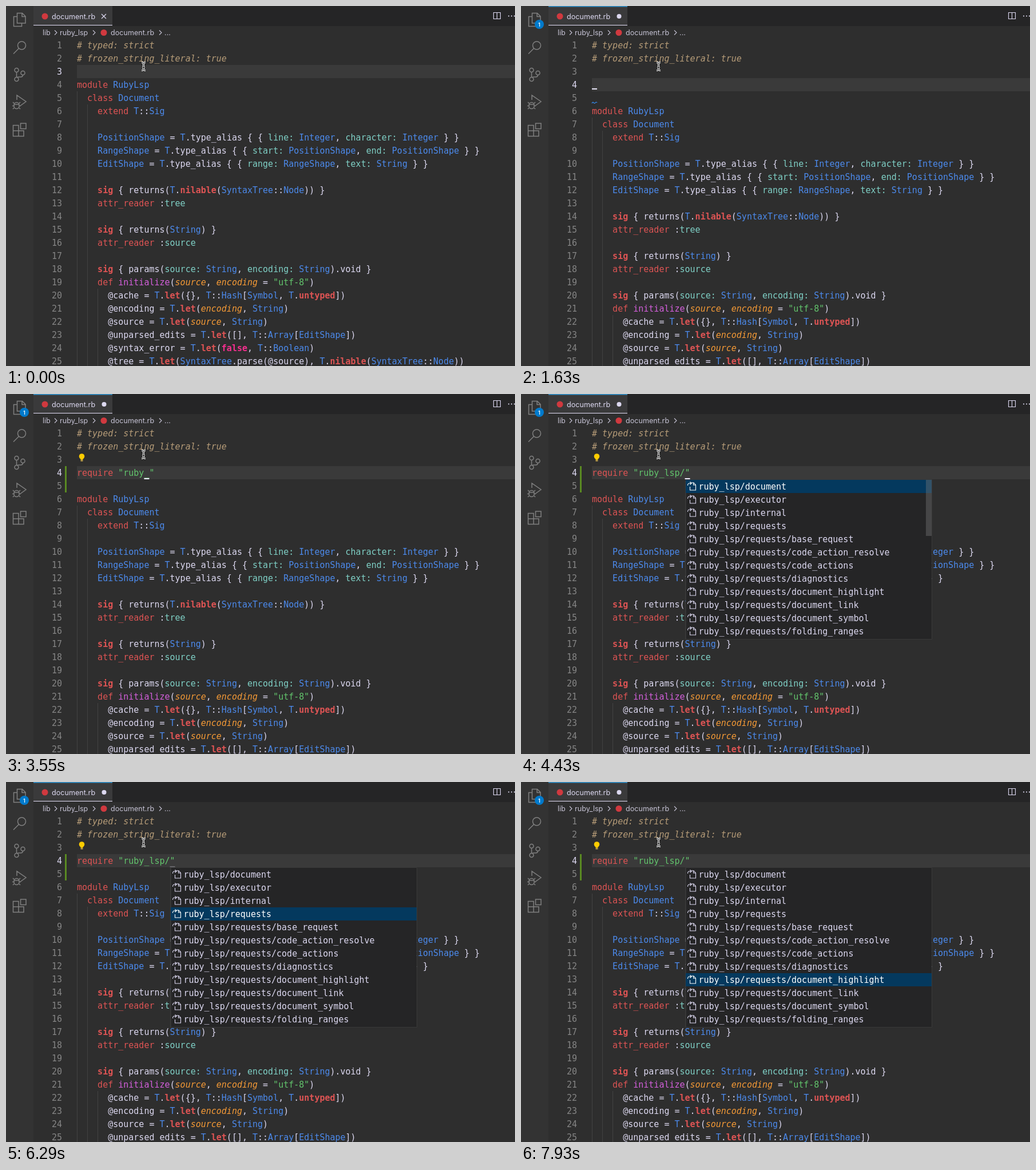
An HTML page with a canvas for the animation above (8000 ms loop, 890 by 629 pixels).

```html
<!DOCTYPE html>
<html>
<head>
<meta charset="utf-8">
<style>
html, body { margin: 0; width: 100%; height: 100%; overflow: hidden; background: #2e2e2e; }
canvas { display: block; }
</style>
</head>
<body>
<canvas id="stage" width="890" height="629"></canvas>
<script>
const ctx = document.getElementById('stage').getContext('2d');
const LOOP = 8000, LEFT = 124, TOP = 57, ROW = 23, CHAR = 9.03;
const MONO = '15px "DejaVu Sans Mono", monospace';
const UI = '12.6px Inter, sans-serif';
const C = {
  bg: '#2e2e2e', fg: '#dcd8f0', red: '#de5454', blue: '#4c8aec', green: '#62c46c',
  teal: '#7fd0c6', tan: '#b69c78', orange: '#f59a36', purple: '#d45fdc', pink: '#f52f8f',
  grey: '#858585', icon: '#808080', error: '#e4685e'
};

const HEAD = ['# typed: strict', '# frozen_string_literal: true', ''];
const BODY = `module RubyLsp
  class Document
    extend T::Sig

    PositionShape = T.type_alias { { line: Integer, character: Integer } }
    RangeShape = T.type_alias { { start: PositionShape, end: PositionShape } }
    EditShape = T.type_alias { { range: RangeShape, text: String } }

    sig { returns(T.nilable(SyntaxTree::Node)) }
    attr_reader :tree

    sig { returns(String) }
    attr_reader :source

    sig { params(source: String, encoding: String).void }
    def initialize(source, encoding = "utf-8")
      @cache = T.let({}, T::Hash[Symbol, T.untyped])
      @encoding = T.let(encoding, String)
      @source = T.let(source, String)
      @unparsed_edits = T.let([], T::Array[EditShape])
      @syntax_error = T.let(false, T::Boolean)
      @tree = T.let(SyntaxTree.parse(@source), T.nilable(SyntaxTree::Node))`.split('\n');

const ITEMS = ['document', 'executor', 'internal', 'requests',
  ...['base_request', 'code_action_resolve', 'code_actions', 'diagnostics', 'document_highlight',
    'document_link', 'document_symbol', 'folding_ranges'].map(s => 'requests/' + s)];

const TYPED = 'require "ruby_lsp/';
const KEYS = [1690, 1760, 1830, 1900, 1960, 2030, 2100, 2190, 2420,
  2980, 3090, 3190, 3290, 3550, 3750, 3840, 3930, 4190];
const NEWLINES = [1390, 1510], CARET_DOWN = 1562, POPUP = 4430;
const PICKS = [5810, 6050, 6290, 6530, 6790, 6970, 7210, 7420];

// Token rules in order of priority: pattern, colour, font style
const RULES = [
  ['^#.*', C.tan, 'italic '],
  ['"[^"]*"', C.green],
  ['@\\w+', C.fg],
  ['\\b(?:sig|let|nilable|untyped)\\b', C.red, 'bold '],
  ['\\bfalse\\b', C.pink, 'bold '],
  ['\\b(?:module|class|extend|attr_reader|def|require)\\b', C.red],
  ['\\binitialize\\b', C.purple],
  ['\\b[A-Z]\\w*', C.blue],
  ['\\b[a-z]\\w*:(?!:)', C.teal],
  ['(?<=\\s:)\\w+', C.teal],
  ['\\b(?:source|encoding)\\b', C.orange, 'italic '],
  ['[^\\s\\w"@]+', C.fg],
  ['\\w+|"', C.fg]
];
const TOKEN = new RegExp(RULES.map(r => `(${r[0]})`).join('|'), 'g');

const clamp = v => Math.max(0, Math.min(1, v));
const ramp = (t, start, length) => clamp((t - start) / length);
const count = (times, t) => times.filter(k => k <= t).length;
const lineTop = n => TOP + ROW * (n - 1);

function rect(x, y, w, h, color) {
  ctx.fillStyle = color;
  ctx.fillRect(x, y, w, h);
}

function text(s, x, y, color, font = MONO, align = 'left') {
  ctx.font = font;
  ctx.textAlign = align;
  ctx.fillStyle = color;
  ctx.fillText(s, x, y);
}

function dot(x, y, r, color) {
  ctx.fillStyle = color;
  ctx.beginPath();
  ctx.arc(x, y, r, 0, 7);
  ctx.fill();
}

function line(d, color, width = 1) {
  ctx.strokeStyle = color;
  ctx.lineWidth = width;
  ctx.stroke(new Path2D(d));
}

function code(s, y) {
  for (const m of s.matchAll(TOKEN)) {
    const [, color, style = ''] = RULES[m.slice(1).findIndex(g => g !== undefined)];
    text(m[0], LEFT + m.index * CHAR, y, color, style + MONO);
  }
}

function squiggle(y, color) {
  line(`M124 ${y + 1}q1.5-3 3-1t3 0t3 0`, color, 1.2);
}

function activityBar(dirty) {
  rect(0, 0, 48, 629, '#333333');
  const d = [
    'M19.5 12.5h9l5.5 5.5v12h-14.500zM28 12.500v6h6M19 18.500h-5.500v17h14v-5',
    'M20.500 69a7 7 0 1 0 14 0a7 7 0 1 0-14 0M22.500 74L13 83.500',
    'M15 112a3.500 3.500 0 1 0 7 0a3.500 3.500 0 1 0-7 0M15 128a3.500 3.500 0 1 0 7 0a3.500 3.500 0 1 0-7 0' +
      'M26 117a3.500 3.500 0 1 0 7 0a3.500 3.500 0 1 0-7 0M18.500 115.500v9M29.500 120.500q0 3.500-4 3.500h-3q-4 0-4 1',
    'M19 164v-8l16 11-11 8M14 173a4.500 4.500 0 0 1 9 0v2a4.500 4.500 0 0 1-9 0z' +
      'M14 172h9M12 168l2 2M25 168l-2 2M11 174.500h3M23 174.500h3M12 180l2-2M25 180l-2-2',
    'M12.500 208.500h9.500v9.500h9v9.500h-18.500zM12.500 218h9.500v9.500M25.500 205h9.500v9.500h-9.500z'
  ];
  d.forEach(p => line(p, C.icon, 1.5));
  if (dirty) {
    dot(32, 32, 8, '#007acc');
    text('1', 32, 35.5, '#fff', '600 9px Inter, sans-serif', 'center');
  }
}

function header(dirty, failing) {
  const width = failing ? 149 : 138, end = 48 + width;
  rect(48, 0, 842, 35, '#252526');
  rect(48, 0, width, 35, '#3a3a3b');
  rect(48, 33, width, 1, C.fg);
  if (dirty) rect(48, 0, width, 1.5, '#2f93d0');
  dot(68, 18, 5.5, '#d0393f');
  text('document.rb', 80, 22.5, failing ? C.error : C.fg, UI);
  if (failing) text('1', 162, 22.5, C.error, UI);
  if (dirty) dot(end - 14.5, 18, 4, C.fg);
  else line('M167 14l8 8m0-8l-8 8', C.fg, 1.2);
  line('M852.500 11.500h12v11h-12zM858.500 11.500v11', C.fg, 1.1);
  for (const x of [879, 884, 889]) dot(x, 17.500, 1.1, C.fg);

  const crumb = '#c5c2d4';
  text('lib', 64, 51, crumb, UI);
  text('ruby_lsp', 94, 51, crumb, UI);
  text('document.rb', 183, 51, crumb, UI);
  text('...', 277, 51, crumb, UI);
  for (const x of [85, 152, 268]) line(`M${x} 42.500l4 4-4 4`, crumb, 1.1);
  dot(171, 46.500, 5.5, '#d0393f');
}

function editor(lines, active, extra) {
  rect(LEFT, lineTop(active), 766, ROW, '#3a3a3a');
  // Indent guides: x and first line
  for (const [x, first] of [[124, 5], [142, 6], [160, 20]]) {
    rect(x, lineTop(first + extra), 1, 629, '#424242');
  }
  lines.slice(0, 25).forEach((s, i) => {
    const y = lineTop(i + 1) + 17;
    text(i + 1, 98, y, i + 1 === active ? C.fg : C.grey, MONO, 'right');
    code(s, y);
  });
}

function caretAlpha(t) {
  if (t < 1390) return ramp(t, 360, 140) - ramp(t, 720, 140);
  if (t < 4770) return 1;
  const p = (t - 4770) % 1010;
  return 1 - ramp(p, 0, 130) + ramp(p, 480, 130);
}

function caret(t, typed) {
  ctx.globalAlpha = caretAlpha(t);
  if (t < 1390) {
    rect(LEFT, lineTop(3), 9, ROW, C.fg);
  } else {
    const col = typed ? typed - 1 + ramp(t, KEYS[typed - 1], 80) : 0;
    const row = 3 + ramp(t, CARET_DOWN, 80);
    rect(LEFT + col * CHAR, lineTop(row + 1) - 2, 9, 2, '#efecff');
  }
  ctx.globalAlpha = 1;
}

function bulb() {
  dot(132.5, 109, 4.8, '#ffcc00');
  rect(130.5, 112, 4, 3, '#ffcc00');
  rect(130.5, 115.5, 4, 2, '#d9b64a');
}

function popup(t) {
  const picked = count(PICKS, t);
  rect(287.5, 149.500, 431, 279, '#454545');
  rect(288.5, 150, 429.500, 278, '#252526');
  ITEMS.forEach((item, i) => {
    const y = 150 + ROW * i, on = i === picked, color = on ? '#ffffff' : C.fg;
    if (on) rect(288, y, 430, ROW, '#04395e');
    line(`M295.500 ${y + 12}v6h10v-9l-3.500-4h-4M301.500 ${y + 5}v4h4` +
      `M291.500 ${y + 10}q0-4 3-4h3M295.500 ${y + 3.500}l2.500 2.500-2.500 2.500`, color, 1.1);
    text('ruby_lsp/' + item, 310.5, y + 17, color);
  });
  ctx.globalAlpha = 1 - ramp(t, 4950, 800);
  rect(708, 150, 10, 98, 'rgba(121,121,121,.4)');
  ctx.globalAlpha = 1;
}

function pointer() {
  const d = 'M237 98.500q3 0 3.500 2q.5-2 3.500-2M240.500 100.500v10M237 112.500q3 0 3.500-2q.5 2 3.500 2M238.500 107.500h4';
  line(d, '#fff', 3);
  line(d, '#111', 1);
}

function draw(t) {
  const extra = count(NEWLINES, t), typed = count(KEYS, t);
  const dirty = extra > 0, failing = t >= 1960 && t < 2750;
  const entry = TYPED.slice(0, typed) + (typed > 8 ? '"' : '');
  rect(0, 0, 890, 629, C.bg);
  editor([...HEAD, ...[entry, ''].slice(0, extra), ...BODY], t < CARET_DOWN ? 3 : 4, extra);
  if (t >= 2480) rect(103, 126, 3, 46, '#5a8a22');
  if (t >= 1600 && t < 1800) squiggle(169, '#3794ff');
  if (t >= 2100 && t < 2750) squiggle(147, '#f14c4c');
  if (t >= 3040) bulb();
  header(dirty, failing);
  activityBar(dirty);
  if (t >= POPUP) popup(t);
  caret(t, typed);
  pointer();
}

const start = performance.now();
function frame() {
  draw((performance.now() - start) % LOOP);
  requestAnimationFrame(frame);
}
frame();
</script>
</body>
</html>
```
